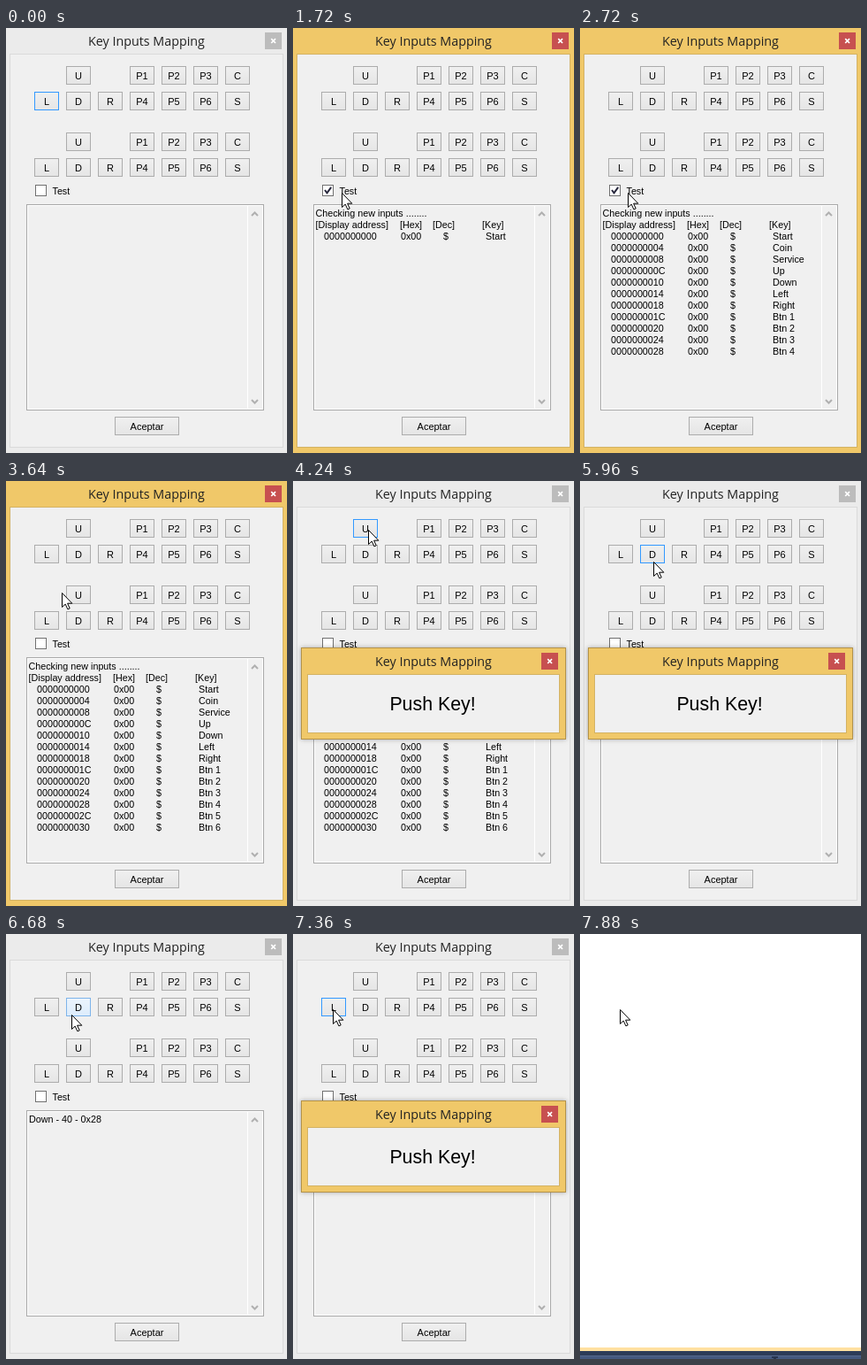
An HTML page with a canvas that plays this animation: 318 px wide and 480 px high, repeating every 8000 ms.

```html
<!DOCTYPE html>
<html lang="en">
<head>
<meta charset="utf-8">
<title>Key Inputs Mapping</title>
<style>
html, body { margin: 0; width: 100%; height: 100%; overflow: hidden; background: #fff; }
canvas { display: block; width: 318px; height: 480px; }
</style>
</head>
<body>
<canvas id="stage" width="318" height="480"></canvas>
<script>
const ctx = document.getElementById('stage').getContext('2d');
const LOOP = 8000, STEP = 80;
const UI = '"Liberation Sans", Arial, sans-serif';
const TITLE = '14.3px "Open Sans", "Noto Sans", sans-serif';
const TITLE_TEXT = 'Key Inputs Mapping';

// Button labels by grid column; a space leaves a gap.
const ROWS = [
  [43, ' U, ,P1,P2,P3,C'],
  [72, 'L,D,R,P4,P5,P6,S'],
  [118, ' U, ,P1,P2,P3,C'],
  [147, 'L,D,R,P4,P5,P6,S']
];
const buttons = ROWS.flatMap(([y, labels], row) => {
  const names = labels.trim().split(',');
  const first = 7 - (names.length === 7 ? 7 : 6);
  return names.map((n, i) => ({ label: n.trim(), x: 32 + 36 * (i + first), y, row }))
    .filter(b => b.label);
});

const KEYS = ['Start', 'Coin', 'Service', 'Up', 'Down', 'Left', 'Right',
  'Btn 1', 'Btn 2', 'Btn 3', 'Btn 4', 'Btn 5', 'Btn 6'];
const KEY_TIMES = [1640, 1800, 1840, 2000, 2080, 2160, 2320, 2440, 2520, 2600, 2720, 2800, 2920];

// Pointer moves: start, end, x, y
const MOVES = [
  [280, 920, 47, 184], [1160, 1240, 55, 186], [2000, 2000, 54, 186],
  [2840, 3000, 46, 180], [3480, 3960, 85, 55], [5360, 5520, 83, 91],
  [6680, 6680, 74, 91], [6720, 7040, 45, 85]
];
// Clicks on buttons: press, dialog frame, dialog body, close, settled
const CLICKS = [
  { key: 'U', press: 4080, open: 4160, body: 4240, close: 4800, idle: 4880 },
  { key: 'D', press: 5760, open: 5840, body: 5960, close: 6280, idle: 6360 },
  { key: 'L', press: 7200, open: 7360, body: 7360, close: 7880, idle: 7880 }
];

function rect(x, y, w, h, fill, stroke) {
  if (fill) { ctx.fillStyle = fill; ctx.fillRect(x, y, w, h); }
  if (stroke) {
    ctx.strokeStyle = stroke;
    ctx.lineWidth = 1;
    ctx.strokeRect(x + .5, y + .5, w - 1, h - 1);
  }
}

function text(s, x, y, font = '10.75px ' + UI, align = 'left', color = '#000') {
  ctx.font = font;
  ctx.textAlign = align;
  ctx.fillStyle = color;
  ctx.fillText(s, x, y);
}

function line(points, color, width) {
  ctx.beginPath();
  points.forEach(([x, y]) => ctx.lineTo(x, y));
  ctx.strokeStyle = color;
  ctx.lineWidth = width;
  ctx.stroke();
}

function closeBox(x, y, color) {
  rect(x, y, 19, 19, color);
  line([[x + 7.2, y + 7.2], [x + 12, y + 12]], '#fff', 1.7);
  line([[x + 12, y + 7.2], [x + 7.2, y + 12]], '#fff', 1.7);
}

const LOOKS = {
  normal: ['#f0f0f0', '#e5e5e5', '#acacac'],
  focus: ['#f0f0f0', '#e5e5e5', '#3399ff'],
  hover: ['#ecf4fc', '#dcecfc', '#7eb4ea'],
  press: ['#daecfc', '#c4e0fc', '#569de5']
};

function button(label, x, y, w, look) {
  const [top, bottom, edge] = LOOKS[look];
  const g = ctx.createLinearGradient(0, y, 0, y + 21);
  g.addColorStop(0, top);
  g.addColorStop(1, bottom);
  rect(x, y, w, 21, g, edge);
  text(label, x + w / 2, y + 15, '11px ' + UI, 'center');
}

function pointerAt(t) {
  let x = 150, y = 490;
  for (const [t0, t1, nx, ny] of MOVES) {
    if (t < t0) break;
    const n = (t1 - t0) / STEP + 1;
    const f = Math.min(1, (Math.floor((t - t0) / STEP) + 1) / n);
    x += (nx - x) * f;
    y += (ny - y) * f;
  }
  return { x: Math.round(x), y: Math.round(y) };
}

function pointer({ x, y }) {
  ctx.beginPath();
  [[0, 0], [0, 16], [3.7, 12.6], [6.4, 18.4], [8.7, 17.4], [6.1, 11.7], [11.3, 11.7]]
    .forEach(([dx, dy]) => ctx.lineTo(x + dx + .5, y + dy + .5));
  ctx.closePath();
  ctx.fillStyle = '#fff';
  ctx.fill();
  ctx.strokeStyle = '#000';
  ctx.lineWidth = 1;
  ctx.stroke();
}

function listLine(i, cells) {
  cells.forEach(([x, s]) => text(s, x, 213 + 13 * i));
}

function list(t) {
  rect(23, 199, 269, 233, '#f0f0f0', '#a9a9a9');
  rect(24, 200, 267, 231, null, '#fff');
  rect(273, 201, 1, 229, '#fff');
  line([[278, 212], [281.5, 208.5], [285, 212]], '#b0b0b0', 2);
  line([[278, 420], [281.5, 423.5], [285, 420]], '#b0b0b0', 2);
  if (t >= 6280) return listLine(0, [[26, 'Down - 40 - 0x28']]);
  if (t >= 4800) return listLine(0, [[26, 'Up - 38 - 0x26']]);
  if (t >= 1160) listLine(0, [[25.5, 'Checking new inputs ........']]);
  if (t >= 1280)
    listLine(1, [[25.5, '[Display address]'], [121, '[Hex]'], [158, '[Dec]'], [214, '[Key]']]);
  KEYS.forEach((key, i) => {
    if (t < KEY_TIMES[i]) return;
    const address = (i * 4).toString(16).toUpperCase().padStart(10, '0');
    listLine(i + 2, [[35, address], [122, '0x00'], [170, '$'], [218, key]]);
  });
}

function checkbox(checked) {
  rect(33, 177, 13, 13, '#fff', '#707070');
  if (checked) line([[36, 183], [38.5, 186.3], [43.2, 179.8]], '#26263c', 2);
  text('Test', 52.5, 188);
}

function mainWindow(t, active, focus, pressed, spot) {
  rect(0, 0, 318, 480, active ? '#f0c869' : '#ebebeb');
  rect(4, 29, 310, 445, '#f0f0f0', active ? '#d3b263' : '#dadada');
  text(TITLE_TEXT, 159, 20, TITLE, 'center', '#222');
  closeBox(293, 5, active ? '#c75050' : '#bcbcbc');
  for (const b of buttons) {
    const over = spot && spot.x >= b.x && spot.x < b.x + 28 && spot.y >= b.y && spot.y < b.y + 21;
    const mine = b.row < 2 && b.label === focus;
    const look = mine && pressed ? 'press' : over ? 'hover' : mine ? 'focus' : 'normal';
    button(b.label, b.x, b.y, 28, look);
  }
  checkbox(t >= 1000 && t < 3400);
  list(t);
  button('Aceptar', 123, 439, 73, 'normal');
}

function dialog(body) {
  ctx.save();
  ctx.beginPath();
  ctx.rect(0, 0, 318, 480);
  ctx.rect(16, 219, 286, 66);
  ctx.clip('evenodd');
  ctx.shadowColor = 'rgba(0,0,0,.3)';
  ctx.shadowBlur = 5;
  rect(9, 188, 300, 104, '#f0c869');
  ctx.shadowColor = 'transparent';
  rect(9, 188, 300, 104, null, '#b3924a');
  ctx.restore();
  if (body) {
    rect(16, 219, 286, 66, '#f0f0f0');
    text('Push Key!', 158, 259, '21.33px ' + UI, 'center');
  }
  rect(16, 218, 286, 67, null, '#d3b263');
  text(TITLE_TEXT, 159, 209, TITLE, 'center', '#222');
  closeBox(281, 194, '#c75050');
}

function desktop() {
  rect(0, 0, 318, 480, '#fff');
  rect(0, 467, 318, 4, '#ffe0a0');
  rect(0, 471, 318, 5, '#2c3b58');
  rect(0, 476, 318, 4, '#44587f');
  rect(0, 476, 318, 1, '#53678c');
  rect(217, 477, 7, 2, '#26344f');
  rect(219, 479, 3, 1, '#26344f');
}

function draw(t) {
  const spot = t >= 280 ? pointerAt(t) : null;
  if (t >= 7880) {
    desktop();
  } else {
    const click = CLICKS.filter(c => t >= c.press).pop();
    const pressed = !!click && t < click.open;
    const modal = !!click && t >= click.open && t < click.close;
    const active = pressed || (t >= 1000 && t < 4160) ||
      (!!click && t >= click.close && t < click.idle);
    const focus = click ? click.key : t < 1000 ? 'L' : '';
    mainWindow(t, active, focus, pressed, modal ? null : spot);
    if (modal) dialog(t >= click.body);
  }
  if (spot) pointer(spot);
}

const start = performance.now();
function tick() {
  draw((performance.now() - start) % LOOP);
  requestAnimationFrame(tick);
}
tick();
</script>
</body>
</html>
```
